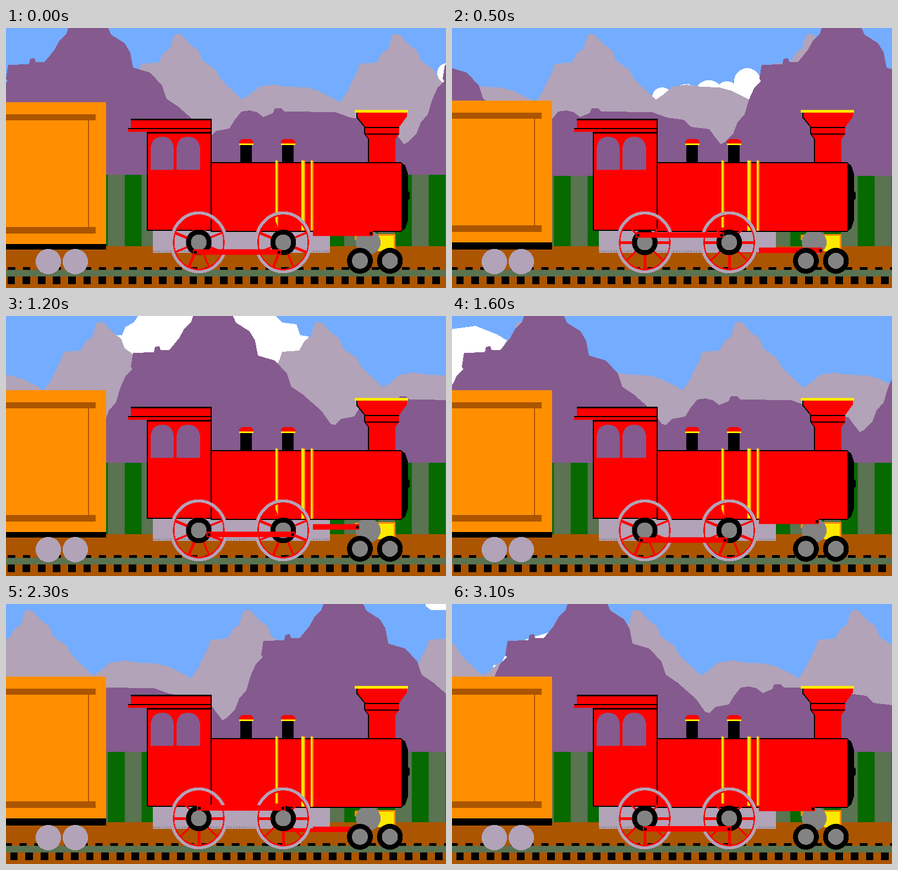
An HTML page without scripts for the animation above (3200 ms loop, 800 by 473 pixels).

```html
<!DOCTYPE html>
<html lang="en">
<head>
<meta charset="utf-8">
<title>Steam train</title>
<style>
html, body { margin: 0; width: 100%; height: 100%; overflow: hidden; background: #74acff; }
svg { display: block; width: 100%; height: 100%; shape-rendering: crispEdges; }

.sky { fill: #74acff; } .white { fill: #fff; }
.lilac { fill: #b2a3b8; } .purple { fill: #855a8e; }
.green { fill: #066a00; } .moss { fill: #5a7350; }
.brown { fill: #ac5500; } .orange { fill: #ff8f00; }
.red { fill: #f00; } .yellow { fill: #ffe800; } .grey { fill: #838383; }

/* every layer advances once per 100 ms; the small lead keeps the beats off rounding edges */
.far, .near, .cloud, .herd { animation: 3.2s -5ms infinite steps(32); }
.far { animation-name: far; }
.near { animation-name: near; }
.c1 { animation-name: c1; } .c2 { animation-name: c2; } .c3 { animation-name: c3; }
.herd { animation-name: herd; }

@keyframes far {
  0% { transform: translateX(311px); animation-timing-function: steps(5); }
  15.625% { transform: translateX(252px); animation-timing-function: steps(7); }
  37.5% { transform: translateX(170px); animation-timing-function: steps(7); }
  59.375% { transform: translateX(88px); animation-timing-function: steps(4); }
  71.875% { transform: translateX(40px); animation-timing-function: steps(4); }
  84.375% { transform: translateX(-7px); animation-timing-function: steps(4); }
  96.875% { transform: translateX(-63px); animation-timing-function: steps(1); }
  100% { transform: translateX(-86px); }
}
@keyframes near {
  0% { transform: translateX(48px); animation-timing-function: steps(5); }
  15.625% { transform: translateX(-187px); animation-timing-function: steps(7); }
  37.5% { transform: translateX(-519px); animation-timing-function: steps(7); }
  59.375% { transform: translateX(-885px); animation-timing-function: steps(4); }
  71.875% { transform: translateX(-1076px); animation-timing-function: steps(4); }
  84.375% { transform: translateX(-1266px); animation-timing-function: steps(4); }
  96.875% { transform: translateX(-1443px); animation-timing-function: steps(1); }
  100% { transform: translateX(-1540px); }
}
@keyframes c1 { from { transform: translate(420px, -44px); } to { transform: translate(-2268px, 238px); } }
@keyframes c2 { from { transform: translate(1229px, -228px); } to { transform: translate(-1523px, 380px); } }
@keyframes c3 { from { transform: translate(2741px, -513px); } to { transform: translate(-11px, 95px); } }
@keyframes herd { from { transform: translateX(1748px); } to { transform: translateX(-1196px); } }

/* two-beat parts */
.field, .low, .high, .wagon, .spokes { animation: .2s -5ms infinite step-end; }
.field { animation-name: field; }
.low { animation-name: low; }
.high { animation-name: high; }
.wagon { animation-name: bounce; }
.spokes { animation-name: spokes; }
@keyframes field { 50% { transform: translate(-30.7px, 2px); } }
@keyframes low { 50% { transform: translateX(5px); } }
@keyframes high { 50% { transform: translateX(-6.5px); } }
@keyframes bounce { 0% { transform: translateY(3px); } 50% { transform: none; } }
@keyframes spokes { 0% { transform: rotate(22.5deg); } 50% { transform: none; } }

.ties { fill: none; stroke: #000; stroke-dasharray: 13.8 13.79; }
.crank { --r: 19px; animation: crank 1.6s -5ms infinite steps(16); }
.opposite { --r: -19px; }
@keyframes crank {
  from { transform: rotate(22.5deg) translateY(var(--r)) rotate(-22.5deg); }
  to { transform: rotate(382.5deg) translateY(var(--r)) rotate(-382.5deg); }
}
</style>
</head>
<body>
<svg viewBox="0 0 800 473" preserveAspectRatio="none">
  <defs>
    <path id="peak" d="M-101 275V136L-87 115L-80 100L-69 78L-65 65L-34 63L-24 45L-13 38L-6 14L0 10L8 13L14 19L24 30L39 41L46 59L70 76L80 94L95 108L109 122L119 130L131 122L149 107L174 103L201 107L234 108L256 114L272 122L288 130L297 136V275Z"/>
    <path id="ridge" d="M-119 275V212L-112 208L-96 193L-88 172L-75 157L-67 130L-57 108L-45 97L-48 92L-44 67L-6 66L-4 56L4 55L6 62L22 62L40 40L48 25L62 10L66-2H137L143 12L168 28L178 45L183 72L214 81L236 105L244 129L265 143L282 158L298 172L316 197L323 198L335 187L358 183L368 167L380 152L395 150L408 153L420 162L437 155L441 146H452L458 152L551 153L578 163L608 167L622 180L655 184L665 198L676 212V275Z"/>
    <path id="cloud" d="M0 80V35H14L20 20L35 12L43 0L60-12L100-24L130-50L190-58L230-42L262-22L293 0L306 12L331 15L338 35L353 37V50L340 70L310 87H10Z"/>
    <g id="cow">
      <path class="white" d="M-8-4h5v5h-5zM-3-3h9v6h-9zM5-5h3v4h-3zM-5 3h3v3h-3zM4 3h4v3h-4z"/>
      <path d="M-3-5h3v4h-3zM2-2h3v3h-3zM-1 3h4v2h-4zM-8 1h3v2h-3z"/>
    </g>
    <pattern id="moss" width="61.4" height="10" patternUnits="userSpaceOnUse">
      <rect class="moss" x=".8" width="30.7" height="10"/>
    </pattern>
    <g id="spokes" fill="none" stroke="#f00">
      <path d="M-48 0H48M0-50V50" stroke-width="5"/>
      <path d="M-35-35L35 35M-35 35L35-35" stroke-width="3"/>
    </g>
    <g id="rim" fill="none">
      <ellipse rx="46" ry="49.5" stroke="#f00" stroke-width="3"/>
      <ellipse rx="49.5" ry="53.5" stroke="#b2a3b8" stroke-width="5.5"/>
    </g>
    <g id="hub">
      <circle r="23.5"/>
      <circle class="grey" r="14.5"/>
    </g>
    <g id="dome">
      <path d="M2 213h21v32H2z"/>
      <path class="yellow" d="M0 210h26v3H0z"/>
      <path class="red" d="M0 210v-4l5-4h16l5 4v4z"/>
    </g>
  </defs>

  <rect class="sky" width="800" height="473"/>
  <g class="cloud c1 white">
    <circle cx="382" cy="126" r="18"/>
    <ellipse cx="426" cy="115" rx="18" ry="13"/>
    <ellipse cx="467" cy="112" rx="22" ry="17"/>
    <ellipse cx="500" cy="112" rx="18" ry="15"/>
    <circle cx="537" cy="97" r="24"/>
    <path d="M368 120H500V108H555V144H368z"/>
  </g>
  <use class="cloud c2 white" href="#cloud"/>
  <use class="cloud c3 white" href="#cloud"/>

  <g class="far lilac">
    <use href="#peak" x="-397"/><use href="#peak"/>
    <use href="#peak" x="397"/><use href="#peak" x="794"/>
  </g>
  <g class="near purple">
    <use href="#ridge"/><use href="#ridge" x="794"/>
    <use href="#ridge" x="1588"/><use href="#ridge" x="2382"/>
  </g>

  <!-- field and track -->
  <g class="field">
    <rect class="green" x="-20" y="267" width="880" height="140"/>
    <rect x="-20" y="267" width="880" height="140" fill="url(#moss)"/>
  </g>
  <g class="herd">
    <use href="#cow" x="741" y="285"/><use href="#cow" x="774" y="284"/>
    <use href="#cow" x="799" y="293"/><use href="#cow" x="771" y="311"/>
    <use href="#cow" x="757" y="329"/><use href="#cow" x="786" y="342"/>
    <use href="#cow" x="726" y="359"/>
  </g>
  <rect class="brown" y="397" width="800" height="76"/>
  <path class="ties high" d="M-24.500 437.500H840" stroke-width="5"/>
  <rect class="moss" y="440" width="800" height="12"/>
  <path class="ties low" d="M-25 459H840" stroke-width="14"/>

  <!-- wagon -->
  <path d="M0 388h182v15H0z"/>
  <g class="wagon">
    <path class="orange" d="M0 132h182v258H0z"/>
    <path class="brown" d="M0 154h163v11H0zM0 359h163v12H0zM149 165h2v194h-2z"/>
  </g>
  <g class="lilac"><circle cx="77" cy="425" r="23"/><circle cx="126" cy="425" r="23"/></g>

  <!-- front truck -->
  <path class="orange" d="M634 376h20v10h-20zM676 375h32v31h-32z"/>
  <path class="yellow" d="M676 378h29v28h-29z"/>
  <circle class="grey" cx="658.500" cy="390" r="22.500"/>

  <!-- locomotive body -->
  <path class="lilac" d="M267 369h322v40H267z"/>
  <path d="M267 406H589" stroke="#838383" stroke-width="2" stroke-dasharray="2.600"/>
  <path d="M372 244H719V371H372z"/>
  <path class="red" d="M374 246H719V369H374z"/>
  <path d="M719 245L726 250L731 265V297L734 299V311L731 313V350L726 365L719 370z"/>
  <path fill-rule="evenodd" d="M256 189H374V369H256zM263 258V219Q265 198 284 198T305 219V258zM310 258V219Q312 198 331 198T353 219V258z"/>
  <path class="red" fill-rule="evenodd" d="M258 192H372V367H258zM263 258V219Q265 198 284 198T305 219V258zM310 258V219Q312 198 331 198T353 219V258z"/>
  <path d="M227 165H374V190H256V184H222V182H227z"/>
  <path class="red" d="M227 168H372V182H227zM222 184H372V189H222z"/>
  <use href="#dome" x="424"/><use href="#dome" x="499.500"/>
  <path d="M637 154H729V161L715 180V192L708 202V245H658V202L651 192V180L637 163z"/>
  <path class="red" d="M639 154H729V161L715 180H653L639 162zM653 182H715V192H653zM654 194H714L708 202V244H660V202z"/>
  <path class="yellow" d="M634 149h97v5h-97zM490 241h5v122h-5zM537 241h7v128h-7zM554 241h5v128h-5z"/>
  <path class="orange" d="M492.500 241h2.500v122h-2.500zM541.500 241h2.500v128h-2.500zM556.500 241h2.500v128h-2.500z"/>

  <!-- main rod, hidden behind the frame until it clears the wheel -->
  <g transform="translate(504 391)">
    <g class="crank opposite">
      <path class="red" d="M0-5H156V5H0z"/>
      <path d="M150-2.500h5v5h-5z"/>
    </g>
  </g>
  <path class="lilac" d="M460 371h98v37h-98z"/>
  <path class="red" d="M460 363h30v6h-30zM495 363h42v6h-42zM544 363h10v6h-10z"/>
  <path d="M460 369h98v2h-98z"/>
  <use href="#hub" x="643.500" y="423.500"/>
  <use href="#hub" x="698" y="423.500"/>

  <!-- driving wheels and coupling rod -->
  <g transform="translate(350.500 390)">
    <use class="spokes" href="#spokes"/><use href="#rim"/><use href="#hub"/>
  </g>
  <g transform="translate(504 390)">
    <use class="spokes" href="#spokes"/><use href="#rim"/><use href="#hub"/>
  </g>
  <g transform="translate(351 390)">
    <g class="crank">
      <path class="red" d="M-4-5H157V5H-4z"/>
      <path d="M-2.500-2.500h5v5h-5zM150-2.500h5v5h-5z"/>
    </g>
  </g>
</svg>
</body>
</html>
```
